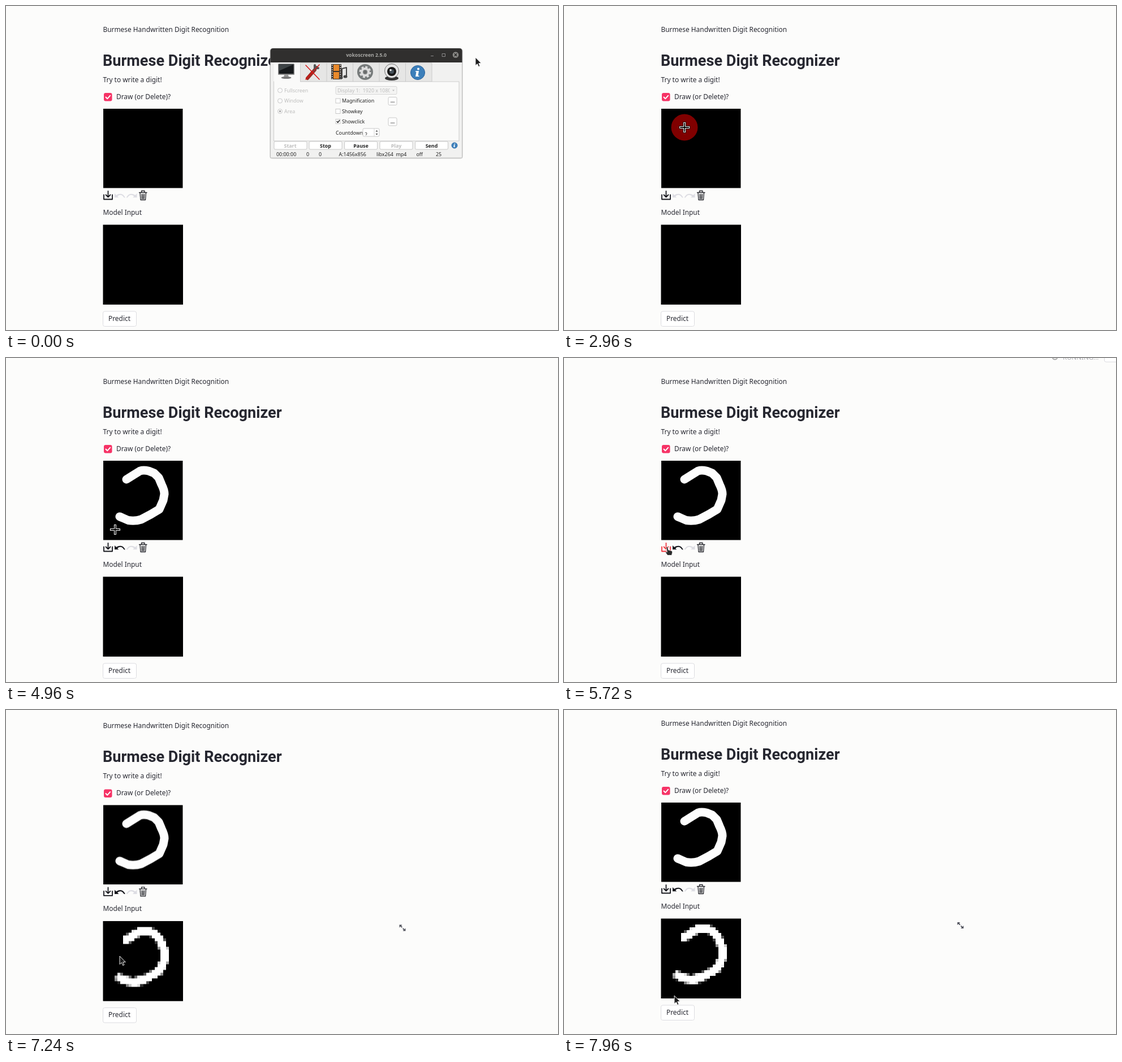
An HTML page with a canvas for the animation above (8000 ms loop, 976 by 574 pixels).

```html
<!DOCTYPE html>
<html lang="en">
<head>
<meta charset="utf-8">
<title>Digit recognizer</title>
<style>
html, body { margin: 0; width: 100%; height: 100%; overflow: hidden; background: #fcfcfb; }
.stage { position: absolute; left: 0; top: 0; width: 976px; height: 574px; overflow: hidden; }
.page, .layer, .move, .pen { position: absolute; left: 0; top: 0; }
.page { width: 976px; height: 574px; }
.move, .pen { width: 0; height: 0; }
svg { overflow: visible; }
text { white-space: pre; }
.line { fill: none; stroke-linecap: round; stroke-linejoin: round; }

.page text { font: 11.9px "Noto Sans", "Open Sans", sans-serif; fill: #262730; }
.page .title { font: 700 27.1px Roboto, sans-serif; }
.ink { fill: none; stroke: #fdfdfd; stroke-width: 15; stroke-linecap: round; stroke-linejoin: round; stroke-dasharray: 100 200; }
.input { position: absolute; left: 172px; top: 388px; width: 141px; height: 141px; image-rendering: pixelated; filter: contrast(2.2); }

.win text { font: 8.9px "Noto Sans", "Open Sans", sans-serif; fill: #222; }
.win .b { font-weight: 700; text-anchor: middle; }
.win .off { fill: #bdbdbd; }
.win .head { fill: #a9a9a6; font-size: 8.7px; }
.box { fill: #fff; stroke: #bbb; stroke-width: .8; }
.win { transform-origin: 174px 548px; }

.win, .ink, .ink-head, .input, .click, .run, .undo, .save, .grow, .page, .move, .pen, .arrow, .cross, .hand {
  animation: 8s linear infinite;
}
.win { animation-name: minimise; }
.ink, .pen { animation-name: draw; }
.ink { animation-name: ink; }
.ink-head, .input, .click, .undo, .save, .grow, .arrow, .cross, .hand { animation-timing-function: step-end; }
.input { animation-name: input; }
.press { animation-name: press; }
.send { animation-name: send; }
.run { animation-name: run; }
.undo { animation-name: undo; }
.save { animation-name: save; }
.grow { animation-name: grow; }
.page { animation-name: scroll; }
.move { animation-name: move; }
.pen { offset-rotate: 0deg; offset-anchor: 0 0; }
.arrow { animation-name: arrow; }
.cross { animation-name: cross; }
.hand { animation-name: hand; }

@keyframes minimise {
  0%, 1% { transform: none; opacity: 1; animation-timing-function: ease-in; }
  4%, 100% { transform: scale(.1); opacity: 0; }
}
@keyframes draw {
  0%, 37% { offset-distance: 0%; }
  47% { offset-distance: 36%; }
  50.5% { offset-distance: 62%; }
  57.5%, 100% { offset-distance: 100%; }
}
@keyframes ink {
  0%, 37% { stroke-dashoffset: 100; opacity: 0; }
  37.5% { opacity: 1; }
  47% { stroke-dashoffset: 64; }
  50.5% { stroke-dashoffset: 38; }
  57.5%, 100% { stroke-dashoffset: 0; opacity: 1; }
}
@keyframes input { 0% { opacity: 0; } 78.9%, 100% { opacity: 1; } }
@keyframes press { 0%, 42.5%, 100% { opacity: 0; } 36.9% { opacity: 1; } }
@keyframes send { 0%, 80.4%, 100% { opacity: 0; } 74.4% { opacity: 1; } }
@keyframes run { 0%, 68.5%, 77%, 100% { opacity: 0; } 71%, 75% { opacity: 1; } }
@keyframes undo { 0% { color: #dddde3; } 57.9%, 100% { color: #15161c; } }
@keyframes save { 0%, 83.6%, 100% { color: #15161c; } 63.5% { color: #f0333c; } }
@keyframes grow { 0% { opacity: 0; } 87%, 100% { opacity: 1; } }
@keyframes scroll {
  0%, 89.5% { transform: none; }
  90.5% { transform: translateY(-13.5px); }
  92.5%, 100% { transform: translateY(-18px); }
}
/* offsets from the pen, which rests at either end of the stroke */
@keyframes move {
  0%, 1% { transform: translate(617px, -124px); animation-timing-function: ease-in; }
  5.5% { transform: translate(427px, 35px); }
  10.5% { transform: translate(193px, 315px); }
  14.5% { transform: translate(4px, -3px); }
  16%, 21% { transform: translate(4px, 25px); }
  25% { transform: translate(257px, -169px); }
  29% { transform: translate(-21px, -25px); }
  31% { transform: translate(0, -1px); }
  32.5% { transform: none; }
  59.5% { transform: none; animation-timing-function: ease-in-out; }
  65% { transform: translate(-19px, 54px); }
  83% { transform: translate(-19px, 54px); animation-timing-function: ease-in-out; }
  89.5%, 90.5% { transform: translate(0, 155px); animation-timing-function: ease-in-out; }
  99.5%, 100% { transform: translate(-6px, 225px); }
}
@keyframes arrow { 0%, 22.2%, 83.6%, 100% { opacity: 1; } 13%, 28.8% { opacity: 0; } }
@keyframes cross { 0%, 22.2%, 63.5%, 100% { opacity: 0; } 13%, 28.8% { opacity: 1; } }
@keyframes hand { 0%, 83.6%, 100% { opacity: 0; } 63.5% { opacity: 1; } }
</style>
</head>
<body>
<div class="stage">
  <div class="page">
    <svg class="layer" width="976" height="574">
      <text x="171.5" y="46">Burmese Handwritten Digit Recognition</text>
      <text class="title" x="171" y="105.5">Burmese Digit Recognizer</text>
      <text x="171.5" y="135">Try to write a digit!</text>
      <rect x="173" y="154" width="14.5" height="14.5" rx="3" fill="#f63366"/>
      <path class="line" d="M176.5 161.5l2.7 2.8 5-5.6" stroke="#fff" stroke-width="2"/>
      <text x="195" y="165">Draw (or Delete)?</text>
      <rect x="172" y="182" width="140.5" height="140.5"/>
      <path class="ink" pathLength="100" d="M213 215L237 200Q243 198 252 200L262 204 270 212 275 224Q280 234 280 241L278 252 271 268 256 277 239 286Q228 289.5 216 287.500L208 284 201 281"/>

      <g class="line save" stroke="currentColor" stroke-width="1.8">
        <path d="M173 334.500V342.500H188V334.500M180.500 328V338M176.500 334.500l4 4 4-4"/>
      </g>
      <svg x="190" y="326" width="44" height="13.500" style="overflow:hidden">
        <g class="undo">
          <path id="turn" d="M2 6L2 13.500H9.500L7 11Q14 5.500 19 14L21 14Q16 2.500 4.800 9Z" fill="currentColor"/>
        </g>
        <use href="#turn" transform="matrix(-1 0 0 1 43.500 0)" style="color:#dddde3"/>
      </svg>
      <path class="line" stroke="#222329" stroke-width="1.300" d="M235.500 330.500H249M239.500 330V327.500H245V330M237 331L238 343.500H246.500L247.500 331M240 333.500L240.400 341.500M242.300 333.500V341.500M244.600 333.500L244.200 341.500"/>

      <text x="171.500" y="370">Model Input</text>
      <rect x="171.500" y="387.500" width="141.500" height="141.500"/>
      <rect x="171.500" y="541" width="59" height="26.500" rx="3" fill="#fff" stroke="#dcdce0"/>
      <text x="181" y="558">Predict</text>
      <g class="grow" fill="#50525c">
        <path d="M695.500 394h5l-1.700 1.700 2.200 2.200-1.400 1.400-2.200-2.200-1.900 1.900Z"/>
        <path d="M706.500 405h-5l1.700-1.700-2.200-2.200 1.400-1.400 2.200 2.200 1.900-1.900Z"/>
      </g>
    </svg>
    <canvas class="input" width="28" height="28"></canvas>
  </div>

  <svg class="layer" width="976" height="574">
    <g class="run">
      <circle cx="868" cy="-2" r="4.500" fill="none" stroke="#aaa" stroke-width="2"/>
      <text x="882" y="3" font-family="Noto Sans, sans-serif" font-size="11.500" fill="#adadb3">RUNNING...</text>
      <rect x="955.500" y="-16" width="48" height="23" rx="3" fill="#fff" stroke="#d9d9de"/>
    </g>

    <g class="win">
      <rect x="466" y="75" width="342" height="196" rx="5" fill="#000" opacity=".12"/>
      <path d="M467.500 269V80q0-5 5-5H801.500q5 0 5 5V269Z" fill="#f1f1f0" stroke="#b5b5b5" stroke-width=".8"/>
      <path d="M467.500 100V80q0-5 5-5H801.500q5 0 5 5V100Z" fill="#302f2e"/>
      <text class="b head" x="637" y="90">vokoscreen 2.5.0</text>
      <path class="line" d="M751.500 88.500h4M771.500 84.500h5v5h-5Z" stroke="#999" stroke-width=".9"/>
      <circle cx="795" cy="86.500" r="5.300" fill="#8b8a87"/>
      <path class="line" d="M793 84.500l4 4m0-4l-4 4" stroke="#222" stroke-width="1.200"/>

      <path d="M520.500 101H753V134H520.500ZM567 101V134M613.500 101V134M660 101V134M706.500 101V134" fill="#e6e6e5" stroke="#c6c6c6" stroke-width=".8"/>
      <rect x="473.500" y="134" width="327.500" height="105" fill="#fafaf9" stroke="#c4c4c4" stroke-width=".8"/>
      <path d="M474 135V100H520V135Z" fill="#fafaf9"/>

      <g>
        <rect x="481" y="102" width="29" height="20" rx="1.500" fill="#888"/>
        <rect x="482.500" y="103.500" width="26" height="16.500" fill="#171a1c"/>
        <path d="M482.500 103.500H508.500L482.500 115Z" fill="#3d4345"/>
        <path d="M492 122h7l1 4h-9Z" fill="#999"/>
        <ellipse cx="495.500" cy="127" rx="9" ry="2" fill="#777"/>
      </g>
      <g class="line">
        <path d="M533 128L546 113" stroke="#9c2b22" stroke-width="6"/>
        <path d="M544 115L549 108M546 105v5h6" stroke="#555" stroke-width="4"/>
        <path d="M530 105L554 130M554 104L530 130" stroke="#d91414" stroke-width="1.500"/>
      </g>
      <g>
        <rect x="575" y="103" width="18" height="27" fill="#3c342e"/>
        <path d="M579 104h10v11h-10ZM579 117h10v12h-10Z" fill="#e98a2c"/>
        <path d="M576.800 104V130M591.200 104V130" stroke="#ddd" stroke-width="1.500" stroke-dasharray="2 2"/>
        <path class="line" d="M594 126V111L602 109V124" stroke="#444" stroke-width="2"/>
        <ellipse cx="592" cy="127" rx="3.500" ry="2.600" fill="#444"/>
        <ellipse cx="600" cy="125" rx="3.500" ry="2.600" fill="#444"/>
      </g>
      <g fill="none">
        <circle cx="635" cy="117" r="14" fill="#777b7b"/>
        <circle cx="635" cy="117" r="9" stroke="#ddd" stroke-width="3" stroke-dasharray="4 3.070"/>
        <circle cx="635" cy="117" r="6" stroke="#ddd" stroke-width="4"/>
        <circle cx="635" cy="117" r="2" fill="#666"/>
      </g>
      <g>
        <ellipse cx="682" cy="128" rx="12" ry="4" fill="#333"/>
        <circle cx="682" cy="115" r="12.500" fill="#e6e6e6" stroke="#777"/>
        <circle cx="682" cy="116" r="8" fill="#191919"/>
        <circle cx="682" cy="116" r="4" fill="#46515a"/>
        <circle cx="680" cy="113.500" r="1.700" fill="#fff"/>
      </g>
      <g id="info">
        <circle cx="728" cy="118" r="12.500" fill="#3c7fba" stroke="#28609a"/>
        <path d="M724.500 115h5.500l-1.500 8.500h2v1.500h-6.500l1.500-8.500h-2Z" fill="#fff"/>
        <circle cx="729" cy="111.500" r="2" fill="#fff"/>
      </g>
      <use href="#info" transform="translate(793 247) scale(.42) translate(-728 -118)"/>

      <g fill="#fafafa" stroke="#c2c2c2" stroke-width=".9">
        <circle cx="484.500" cy="149.500" r="4"/><circle cx="484.500" cy="168" r="4"/><circle cx="484.500" cy="186.500" r="4"/>
      </g>
      <circle cx="484.500" cy="186.500" r="1.800" fill="#aaa"/>
      <text class="off" x="492" y="152.500">Fullscreen</text>
      <text class="off" x="492" y="171">Window</text>
      <text class="off" x="492" y="189.500">Area</text>
      <rect x="583" y="142.500" width="108" height="14" rx="2" fill="#f4f4f3" stroke="#cfcfcf" stroke-width=".8"/>
      <svg x="583" y="142" width="95.500" height="15" style="overflow:hidden"><text class="off" x="3" y="10.500">Display 1:  1920 x 1080</text></svg>
      <path d="M683 148.500h4l-2 2.500Z" fill="#bbb"/>
      <rect class="box" x="583" y="164" width="8" height="8"/>
      <rect class="box" x="583" y="182.500" width="8" height="8"/>
      <rect class="box" x="583" y="200.500" width="8" height="8"/>
      <path class="line" d="M585 204.500l1.700 2 3-4" stroke="#222" stroke-width="1.300"/>
      <text x="594" y="171">Magnification</text>
      <text x="594" y="189.500">Showkey</text>
      <text x="594" y="207.500">Showclick</text>
      <rect class="box" x="676" y="161.500" width="15" height="14" rx="2"/>
      <rect class="box" x="676" y="198" width="15" height="14" rx="2"/>
      <text class="b" x="683.500" y="171">...</text>
      <text class="b" x="683.500" y="207.500">...</text>
      <text x="583" y="227.500">Countdown</text>
      <rect class="box" x="631" y="217" width="29" height="14" rx="2"/>
      <svg x="631" y="217" width="20" height="12" style="overflow:hidden"><text x="3" y="13.500">2</text></svg>
      <path d="M651 217V231" stroke="#ccc" stroke-width=".8"/>
      <path d="M653.500 222.500h4l-2-2.500ZM653.500 226h4l-2 2.500Z" fill="#444"/>

      <g class="box">
        <rect x="474" y="240" width="58" height="14" rx="2"/><rect x="536" y="240" width="58" height="14" rx="2"/>
        <rect x="598.500" y="240" width="58" height="14" rx="2"/><rect x="661" y="240" width="58" height="14" rx="2"/>
        <rect x="723.500" y="240" width="58" height="14" rx="2"/>
      </g>
      <text class="b off" x="502.500" y="250.500">Start</text>
      <text class="b" x="565" y="250.500">Stop</text>
      <text class="b" x="627.500" y="250.500">Pause</text>
      <text class="b off" x="690" y="250.500">Play</text>
      <text class="b" x="752.500" y="250.500">Send</text>
      <text y="265.500"><tspan x="478">00:00:00</tspan><tspan x="531">0</tspan><tspan x="553">0</tspan><tspan x="588.500">A:1456x856</tspan><tspan x="655">libx264</tspan><tspan x="689.500">mp4</tspan><tspan x="725.500">off</tspan><tspan x="760">25</tspan></text>
    </g>

    <circle class="click press" cx="213" cy="215" r="23.500" fill="#f00" fill-opacity=".5"/>
    <circle class="click send" cx="181" cy="336.500" r="23.500" fill="#f00" fill-opacity=".5"/>
  </svg>

  <div class="move"><div class="pen">
    <svg class="layer" width="1" height="1">
      <path class="arrow" d="M0 0V14.500L3.400 11.500 5.600 16.500 8 15.500 5.800 10.600H10.300Z" fill="#1c1c1c" stroke="#fff" stroke-width=".9"/>
      <g class="cross" fill="none" stroke-linecap="square">
        <path id="plus" d="M-7 0H7M0-7V7" stroke="#000" stroke-width="5.500"/>
        <path d="M-7 0H7M0-7V7" stroke="#fff" stroke-width="4"/>
        <path d="M-7 0H7M0-7V7" stroke="#000" stroke-width="1.800"/>
      </g>
      <path class="hand" d="M-1.300 0Q0-1.600 1.500 0L2.500 5 8 6.500Q10 7 9.600 9.500L8.500 14.500H1L-2.500 9.500Q-2.500 7.500 .3 8.800Z" fill="#2b2b2b" stroke="#fff" stroke-width=".8"/>
    </svg>
  </div></div>
</div>
<script>
const stroke = document.querySelector('.ink').getAttribute('d');
document.querySelector('.pen').style.offsetPath = `path("${stroke}")`;

// the model sees the drawing at 28 x 28
const ctx = document.querySelector('.input').getContext('2d');
ctx.fillRect(0, 0, 28, 28);
ctx.scale(.2, .2);
ctx.translate(-172, -182);
ctx.lineWidth = 15;
ctx.lineCap = ctx.lineJoin = 'round';
ctx.strokeStyle = '#fff';
ctx.stroke(new Path2D(stroke));
</script>
</body>
</html>
```
